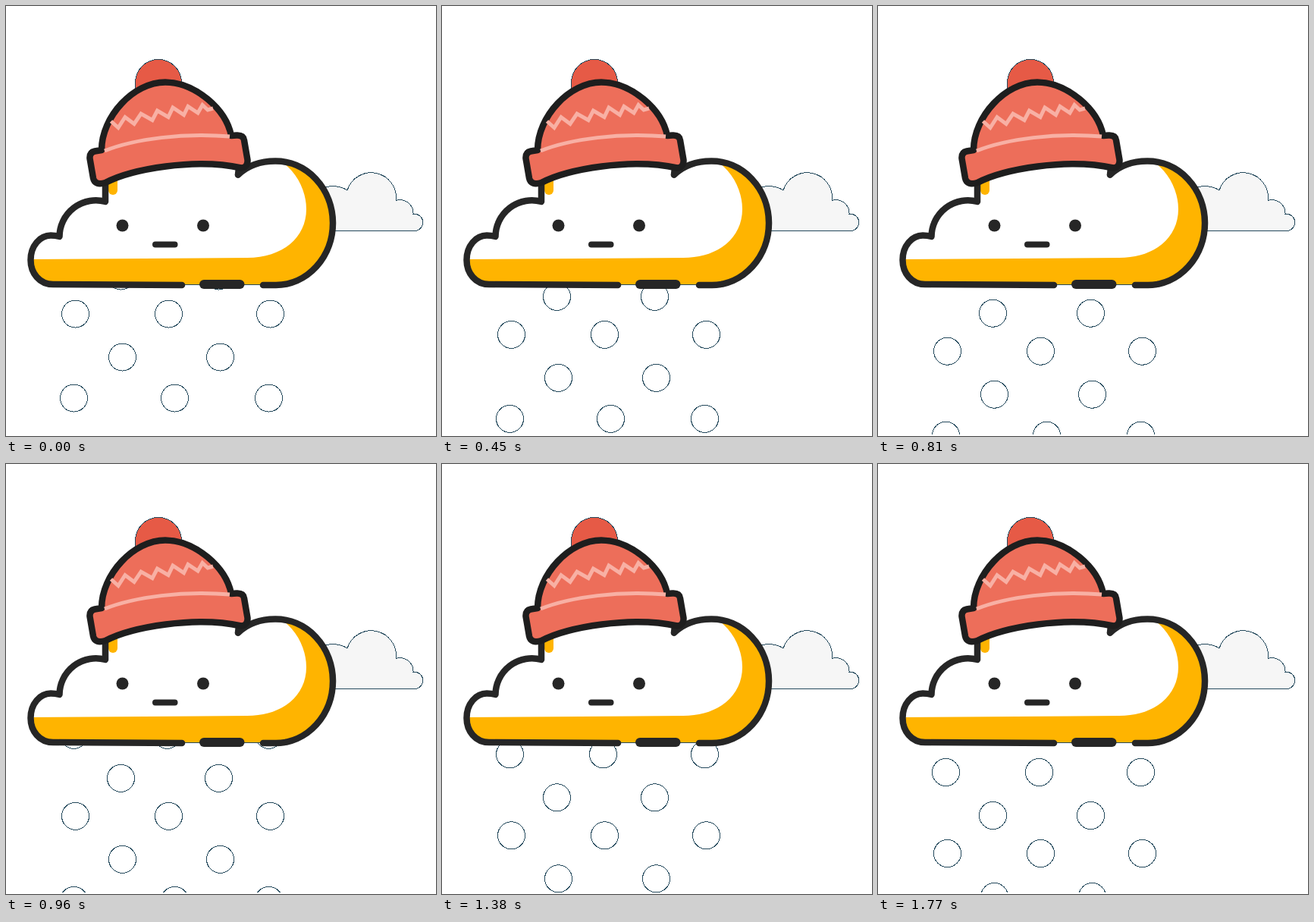
Animation, 567 px wide and 567 px high, one loop 1.8 s. Source, as an HTML page:

```html
<!DOCTYPE html>
<html lang="en">
<head>
<meta charset="utf-8">
<title>Snow cloud</title>
<style>
  html, body { margin: 0; width: 100%; height: 100%; overflow: hidden; background: #fff; }
  svg { display: block; width: 100%; height: 100%; }
  .thin { stroke: #24495c; stroke-width: 1; shape-rendering: crispEdges; }
  .ink { stroke: #262626; stroke-width: 8.5; stroke-linecap: round; stroke-linejoin: round; }
  .knit { fill: none; stroke: #f8b0a4; stroke-width: 5; }
</style>
</head>
<body>
<svg viewBox="0 0 567 567">
  <defs>
    <clipPath id="sky"><rect width="567" height="565"/></clipPath>
    <clipPath id="body">
      <path d="M62 367C44 367 32.5 352 32.5 335C32.5 316 45 302.5 59 302.5Q65 302.5 70.5 304A48 48 0 0 1 131 258V200H306V222Q325 204.500 355 204.500A75.500 81.750 0 0 1 356 368Z"/>
    </clipPath>
  </defs>

  <path class="thin" fill="#f6f6f6" d="M410 296.500V242Q435 233 450 243A33 33 0 0 1 514.300 256.500A17.500 17.500 0 0 1 537 274.300A11.200 11.200 0 1 1 540 296.500Z"/>

  <g clip-path="url(#sky)"><g id="snow" class="thin" fill="#fff"></g></g>

  <g clip-path="url(#body)">
    <rect x="25" y="195" width="415" height="180" fill="#ffb400"/>
    <path fill="#fff" d="M25 334L318 332C365 332 396 305 396 268C396 245 385 222 366 207L350 195H25Z"/>
    <path stroke="#ffb400" stroke-width="12" stroke-linecap="round" d="M141 226V243"/>
  </g>
  <path class="thin" d="M230 367.500H340"/>
  <g class="ink" fill="none">
    <path d="M232 368L62 367C44 367 32.500 352 32.500 335C32.500 316 45 302.500 59 302.500Q65 302.500 70.500 304A48 48 0 0 1 131 258V232"/>
    <path fill="#262626" d="M307 213L306 222.500L316 213Z"/>
    <path d="M306 222.500Q325 204.500 355 204.500A75.500 81.750 0 0 1 356 368H339"/>
    <path d="M261 367H308.500" style="stroke-width:12"/>
    <path d="M197 314.500H222.500" style="stroke-width:8"/>
  </g>
  <g fill="#262626">
    <circle cx="153.500" cy="289.500" r="8"/>
    <circle cx="260" cy="289.500" r="8"/>
  </g>

  <path class="thin" fill="#e65a46" d="M170.500 112V101A30.500 30.500 0 0 1 231.500 101V112Z"/>
  <path class="ink" style="stroke:#1e1e1e" fill="#ed6e5a"
    d="M126 190C126 146 168 100.500 210 100.500C250 101 290 136 297 171L304 170.500Q313 170 314 177L318.500 203Q319 213 310 213.500C250 200 165 215 131 233Q117 237 115 227L110.500 201Q110 193 117 191.500Z"/>
  <path class="knit" d="M130 191C170 175 235 167 295 172"/>
  <path class="knit" d="M138.500 152L148 160.500L157 146.500L169 155.500L178 142L193 150.500L199.500 138L214 146.500L220 134L234.500 143.500L240 132.500L253 141L259 130.500L266 137L273 135"/>
</svg>
<script>
  const LOOP = 1800, STEP = 30, SPEED = 107.5 / 1770;
  const rows = [
    [299, 89.5, 212.5, 346.5],
    [356, 151.5, 280.5],
    [406, 91.5, 214.5, 348.5],
    [463, 153.5, 282.5],
    [517, 89.5, 222.5, 346.5]
  ];
  const snow = document.getElementById('snow');

  for (const [y, ...xs] of rows) {
    for (const x of xs) {
      const flake = document.createElementNS(snow.namespaceURI, 'circle');
      flake.setAttribute('cx', x);
      flake.setAttribute('cy', y);
      flake.setAttribute('r', 18);
      snow.append(flake);
    }
  }

  function draw(ms) {
    const t = Math.floor(ms % LOOP / STEP) * STEP;
    snow.setAttribute('transform', `translate(0 ${t * SPEED})`);
  }

  function tick() {
    draw(performance.now());
    requestAnimationFrame(tick);
  }
  tick();
</script>
</body>
</html>
```
